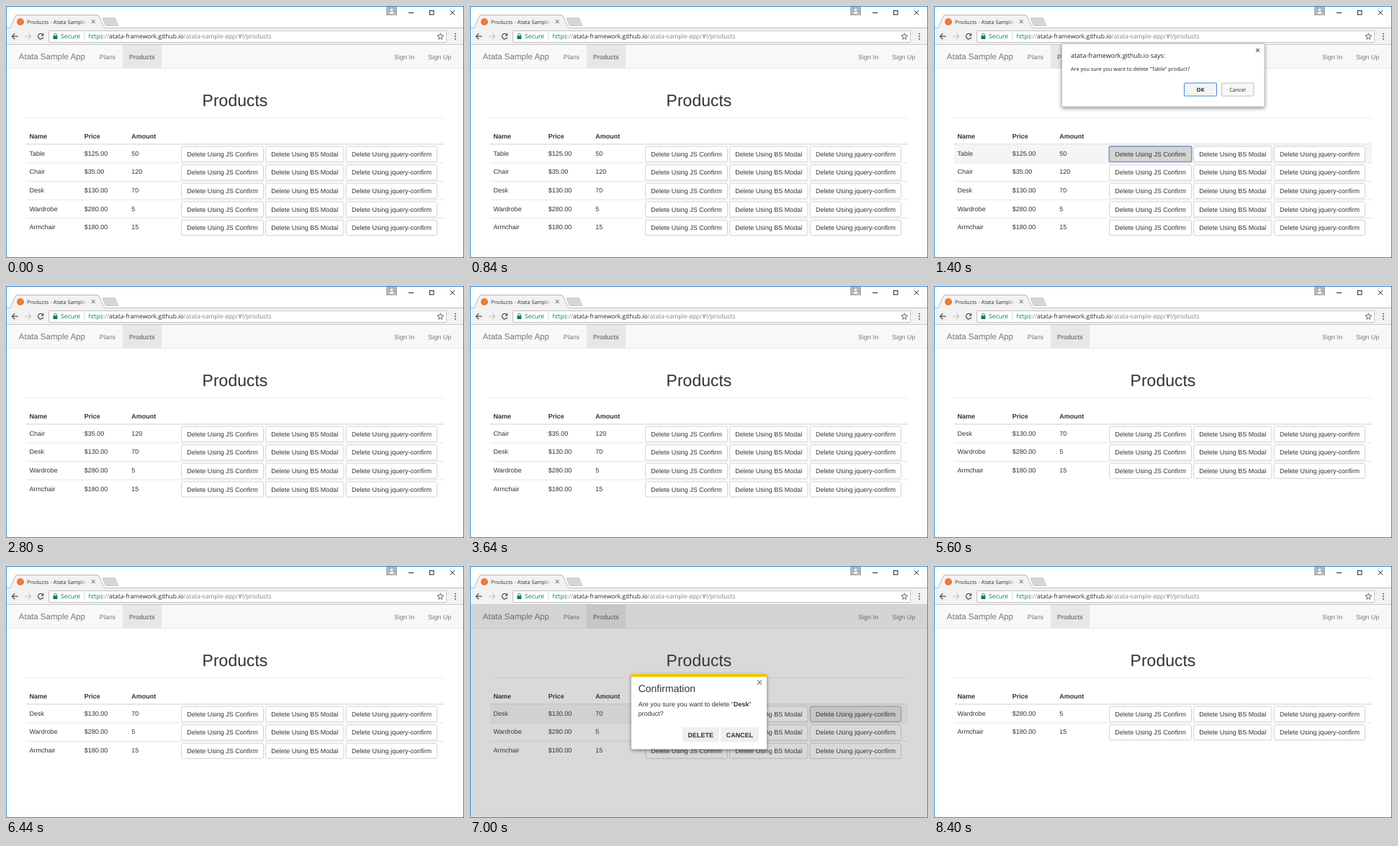
Write an HTML page that moves like this. It is 636 px wide and 350 px high and loops after 9.8 s.

```html
<!DOCTYPE html>
<html lang="en">
<head>
<meta charset="utf-8">
<title>Products</title>
<style>
html, body { margin: 0; width: 100%; height: 100%; overflow: hidden; background: #fff; }
svg { display: block; width: 636px; height: 350px; }
text { font: 9px "Liberation Sans", Arial, sans-serif; fill: #333; white-space: pre; text-rendering: geometricPrecision; }
.ui { font-family: "Open Sans", "Noto Sans", sans-serif; }
.b { font-weight: bold; }
</style>
</head>
<body>
<svg viewBox="0 0 636 350">
  <defs>
    <linearGradient id="fade">
      <stop offset="0" stop-color="#f2f2f2" stop-opacity="0"/>
      <stop offset="1" stop-color="#f2f2f2"/>
    </linearGradient>
    <filter id="shadow" x="-10%" y="-15%" width="120%" height="140%">
      <feDropShadow dx="0" dy="2" stdDeviation="2.5" flood-opacity=".45"/>
    </filter>
  </defs>
  <g id="page"></g>
  <g id="browser"></g>
  <g id="dialog"></g>
</svg>
<script>
const STEP = 1400;
const products = [
  ['Table', '$125.00', 50], ['Chair', '$35.00', 120], ['Desk', '$130.00', 70],
  ['Wardrobe', '$280.00', 5], ['Armchair', '$180.00', 15]
];
const deleteButtons = [
  [243.5, 114, 'Delete Using JS Confirm'],
  [360.5, 108.5, 'Delete Using BS Modal'],
  [472.3, 126.3, 'Delete Using jquery-confirm']
];

// SVG helpers
const rect = (x, y, w, h, fill, extra = '') =>
  `<rect x="${x}" y="${y}" width="${w}" height="${h}" fill="${fill}" ${extra}/>`;
const path = (d, stroke, width = 1, fill = 'none') =>
  `<path d="${d}" stroke="${stroke}" stroke-width="${width}" fill="${fill}"/>`;
const text = (x, y, str, { size = 9, color = '#333', cls = '', anchor = 'start' } = {}) =>
  `<text x="${x}" y="${y}" class="${cls}" text-anchor="${anchor}" style="font-size:${size}px;fill:${color}">${str}</text>`;
const cross = (x, y, r, color, width) =>
  path(`M${x - r} ${y - r}l${2 * r} ${2 * r}m0 ${-2 * r}l${-2 * r} ${2 * r}`, color, width);
const button = (x, y, w, label, fill = '#fff', border = '#ccc', color = '#333') =>
  rect(x, y, w, 21.2, fill, `rx="2.5" stroke="${border}" stroke-width=".9"`) +
  text(x + w / 2, y + 13.8, label, { color, anchor: 'middle' });

function drawBrowser() {
  const ui = (x, y, str, size, color) => text(x, y, str, { size, color, cls: 'ui' });
  return rect(1, 1, 634, 30, '#fff') +
    rect(1, 30, 634, 24, '#f2f2f2') +
    path('M1 30.5H635', '#bcbcbc') +
    path('M4 30.5Q6.500 30 7.500 27L12.500 15Q13.500 12.500 16 12.500H126Q128.500 12.500 129.500 15L134.500 27Q135.500 30 138 30.5', '#b4b4b4', 1, '#f2f2f2') +
    rect(5, 30, 132, 2, '#f2f2f2') +
    path('M134 17.500Q133.500 16.500 135 16.500H150Q151.500 16.500 152 17.500L155.500 26Q156 27.500 154 27.500H140Q138 27.500 137.500 26Z', '#bebebe', .7, '#d5d5d5') +
    '<circle cx="20" cy="22" r="5" fill="#ee7a3b"/>' +
    ui(29, 24.600, 'Products - Atata Sample', 7.35, '#333') +
    rect(102, 15, 11, 13, 'url(#fade)') +
    cross(121.3, 21.7, 2.4, '#555', 1) +
    // window controls
    rect(528, 1, 15, 12, '#b2b2b2') +
    '<circle cx="535.5" cy="5.300" r="1.700" fill="#fff"/><path d="M532 10.500q0-2.500 3.500-2.500t3.500 2.500z" fill="#fff"/>' +
    path('M559 9.500h7', '#222') +
    rect(588.5, 6.500, 5.500, 5.500, 'none', 'stroke="#222"') +
    cross(620, 9.300, 3.200, '#222', 1) +
    // toolbar
    path('M17 42.200H8.500M12.300 38.200l-4 4l4 4', '#555', 1.3) +
    path('M26 42.200h8.500M30.700 38.200l4 4l-4 4', '#c8c8c8', 1.3) +
    path('M51.200 40A3.700 3.700 0 1 0 51.700 43.200', '#555', 1.3) +
    '<path d="M52.300 37.500v4h-4z" fill="#555"/>' +
    rect(59.5, 34.500, 552, 16, '#fff', 'rx="1.500" stroke="#bdbdbd" stroke-width=".9"') +
    rect(65.5, 41.200, 6, 4.800, '#0b8043', 'rx=".5"') +
    path('M66.800 41.500v-1.500a1.700 1.700 0 0 1 3.400 0v1.500', '#0b8043', .9) +
    ui(76, 45.300, 'Secure', 8.600, '#0b8043') +
    path('M108.500 37v11', '#ddd') +
    ui(114.3, 45.300, '<tspan fill="#0b8043">https</tspan>://<tspan fill="#222">atata-framework.github.io</tspan>/atata-sample-app/#!/products', 8.5, '#808080') +
    path('M603.300 37.800l1.200 3l3.200.2l-2.500 2l.8 3.200l-2.700-1.700l-2.700 1.700l.8-3.200l-2.500-2l3.200-.2z', '#555', .9) +
    [38.700, 42.200, 45.700].map(y => `<circle cx="624" cy="${y}" r="1" fill="#555"/>`).join('') +
    path('M1 53.500H635', '#c9c9c9') +
    rect(.5, .5, 635, 349, 'none', 'stroke="#3a8ad0"');
}

function drawRow([name, price, amount], i, pressed) {
  const y = 192.3 + i * 25.6, base = y + 15.5;
  return (pressed >= 0 ? rect(28, y, 580, 25.2, '#f5f5f5') : '') +
    (i ? rect(28, y - .4, 580, .8, '#ddd') : '') +
    text(32.5, base, name) + text(108.7, base, price) + text(174.3, base, amount) +
    deleteButtons.map(([x, w, label], k) => {
      if (k !== pressed) return button(x, y + 2.700, w, label);
      return k ? button(x, y + 2.700, w, label, '#e6e6e6', '#999')
        : button(x, y + 2.700, w, label, '#d4d4d4', '#8c8c8c') +
          rect(x - .4, y + 2.300, w + .8, 22, 'none', 'rx="2.500" stroke="#6f9fe0" stroke-width="1.300"');
    }).join('');
}

function drawPage(removed, pressed) {
  const link = (x, str, color = '#777') => text(x, 73.600, str, { color });
  const head = (x, str) => text(x, 183.500, str, { cls: 'b' });
  return rect(0, 0, 636, 350, '#fff') +
    rect(1, 54, 634, 32, '#f8f8f8') + rect(1, 86, 634, .8, '#e3e3e3') +
    rect(161.7, 54, 54.300, 32.500, '#e7e7e7') +
    text(17.8, 74.300, 'Atata Sample App', { size: 11.5, color: '#777' }) +
    link(129.7, 'Plans') + link(171, 'Products', '#555') +
    link(539, 'Sign In') + link(586.3, 'Sign Up') +
    text(318, 138.700, 'Products', { size: 23, anchor: 'middle' }) +
    rect(28, 155, 580, .8, '#eaeaea') +
    head(32.5, 'Name') + head(108.7, 'Price') + head(174.3, 'Amount') +
    rect(28, 191.300, 580, 1.200, '#d8d8d8') +
    products.slice(removed).map((p, i) => drawRow(p, i, i ? -1 : pressed)).join('');
}

const question = 'Are you sure you want to delete ';
const bold = str => `"<tspan class="b">${str}</tspan>"`;
const overlay = (color, opacity) => rect(1, 54, 634, 295, color, `opacity="${opacity}"`);

const dialogs = [
  () => {
    const ui = (x, y, str, size, cls = '', anchor = 'start') =>
      text(x, y, str, { size, cls: 'ui ' + cls, color: '#222', anchor });
    return rect(177.5, 52.500, 281.500, 87.300, '#fff', 'rx="1" stroke="#b5b5b5" stroke-width=".8" filter="url(#shadow)"') +
      cross(449.5, 61.500, 2.300, '#555', 1.100) +
      ui(190, 71.700, 'atata-framework.github.io says:', 8.93) +
      ui(190, 90.300, question + '"Table" product?', 7.29) +
      rect(347.5, 107, 45, 18, '#f4f4f4', 'rx="1" stroke="#4285d4"') +
      rect(399.5, 107, 44.500, 18, '#f8f8f8', 'rx="1" stroke="#b8b8b8" stroke-width=".9"') +
      ui(370, 118.600, 'OK', 7.4, 'b', 'middle') +
      ui(421.5, 118.600, 'Cancel', 7.3, '', 'middle');
  },
  () => overlay('#000', .5) +
    rect(127.3, 74.300, 381.500, 109, '#fff', 'rx="4" stroke="#000" stroke-opacity=".2" stroke-width=".7" filter="url(#shadow)"') +
    text(137, 95, 'Confirmation', { size: 11.5 }) +
    text(495.2, 94, '×', { size: 13.5, color: '#bbb', cls: 'b', anchor: 'middle' }) +
    rect(127.5, 109, 381, .8, '#e3e3e3') +
    text(137, 129, question + bold('Chair') + ' product?') +
    rect(127.5, 141.300, 381, .8, '#e3e3e3') +
    button(407, 152.300, 42.500, 'Delete', '#337ab7', '#2e6da4', '#fff') +
    button(455, 152.300, 44.500, 'Cancel'),
  () => overlay('#444', .2) +
    rect(224, 149.500, 188, 104.800, '#fff', 'rx="2.500" filter="url(#shadow)"') +
    '<path d="M224 154v-2q0-2.500 2.500-2.500h183q2.500 0 2.500 2.500v2z" fill="#f1c40f"/>' +
    text(233.7, 174.600, 'Confirmation', { size: 14 }) +
    cross(402, 161.700, 3, '#777', 1.200) +
    text(233.7, 195.300, question + bold('Desk')) +
    text(233.7, 208.200, 'product?') +
    [[295, 50.500, 'DELETE'], [348, 53, 'CANCEL']].map(([x, w, label]) =>
      rect(x, 224, w, 20.500, '#ecf0f1', 'rx="2"') +
      text(x + w / 2, 237.500, label, { cls: 'b', anchor: 'middle' })).join('')
];

const [page, browser, dialog] = ['page', 'browser', 'dialog'].map(id => document.getElementById(id));
browser.innerHTML = drawBrowser();

// Odd steps ask for confirmation; the next step shows the row removed.
let shown = -1;
function tick(now) {
  const step = Math.floor(now / STEP) % 7;
  if (step !== shown) {
    shown = step;
    const removed = step >> 1, asking = step % 2;
    page.innerHTML = drawPage(removed, asking ? removed : -1);
    dialog.innerHTML = asking ? dialogs[removed]() : '';
  }
  requestAnimationFrame(tick);
}
tick(performance.now());
</script>
</body>
</html>
```
